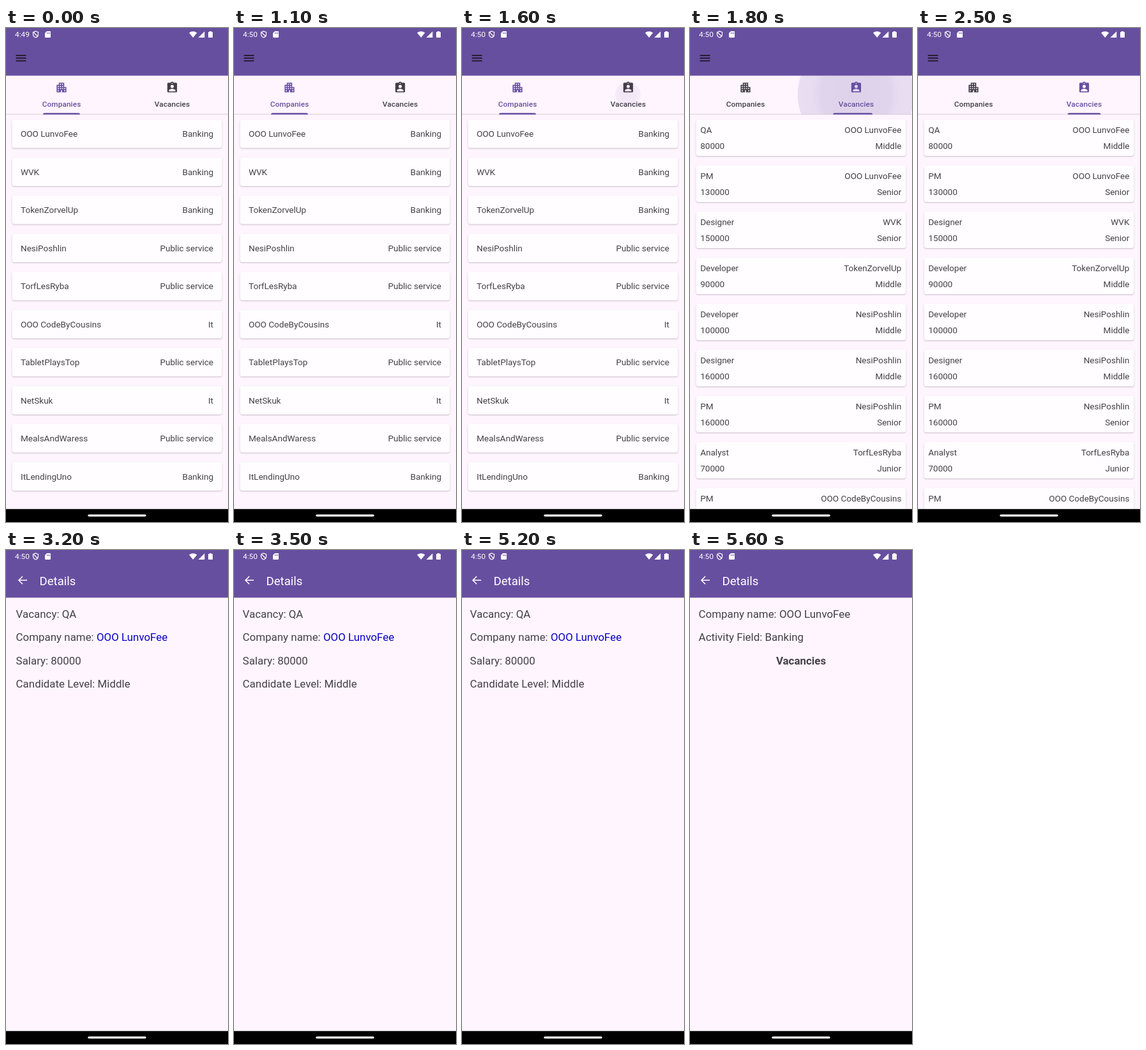
These frames come from a looping animation (348x772 px, 8 s). An HTML page with a canvas:

```html
<!DOCTYPE html>
<html lang="en">
<head>
<meta charset="utf-8">
<title>Vacancies app</title>
<style>
  html, body { margin: 0; width: 100%; height: 100%; overflow: hidden; background: #000; }
  canvas { display: block; }
</style>
</head>
<body>
<canvas id="stage" width="348" height="772"></canvas>
<script>
const ctx = document.getElementById('stage').getContext('2d');
const W = 348, LOOP = 8000;
const BAR_BOTTOM = 74.4, TABS_BOTTOM = 135.3, NAV_TOP = 751.7;
const PURPLE = '#674fa0', SURFACE = '#fef5fe', INK = '#444048', LINK = '#0a02c4';
const TIMES = { clock: 1000, press: 1570, tab: 1611, vacancy: 2970, company: 5170 };

const PAY = 'OOO LunvoFee', TRIO = 'WVK', TOKEN = 'TokenZorvelUp', DUTY = 'NesiPoshlin',
      PEAT = 'TorfLesRyba', CODE = 'OOO CodeByCousins';
const companies = [
  [PAY, 'Banking'], [TRIO, 'Banking'], [TOKEN, 'Banking'], [DUTY, 'Public service'],
  [PEAT, 'Public service'], [CODE, 'It'], ['TabletPlaysTop', 'Public service'],
  ['NetSkuk', 'It'], ['MealsAndWaress', 'Public service'], ['ItLendingUno', 'Banking']
];
const vacancies = [
  ['QA', PAY, 80000, 'Middle'], ['PM', PAY, 130000, 'Senior'],
  ['Designer', TRIO, 150000, 'Senior'], ['Developer', TOKEN, 90000, 'Middle'],
  ['Developer', DUTY, 100000, 'Middle'], ['Designer', DUTY, 160000, 'Middle'],
  ['PM', DUTY, 160000, 'Senior'], ['Analyst', PEAT, 70000, 'Junior'],
  ['PM', CODE, 120000, 'Middle']
];

const clamp = x => Math.min(1, Math.max(0, x));
const lerp = (a, b, k) => a + (b - a) * k;

// Height of a cubic Bezier curve at a given x, found by bisection.
function curveAt(x, xs, ys) {
  const at = ([a, b, c, d], s) =>
    a * (1 - s) ** 3 + 3 * b * s * (1 - s) ** 2 + 3 * c * s * s * (1 - s) + d * s ** 3;
  let lo = 0, hi = 1;
  for (let i = 0; i < 24; i++) {
    const mid = (lo + hi) / 2;
    if (at(xs, mid) < x) lo = mid; else hi = mid;
  }
  return at(ys, lo);
}
const standardEase = x => curveAt(x, [0, 0.4, 0.2, 1], [0, 0, 1, 1]);
const windowEase = x => x < 1 / 6
  ? curveAt(x, [0, 0.05, 0.1333, 1 / 6], [0, 0, 0.06, 0.4])
  : curveAt(x, [1 / 6, 0.2083, 0.25, 1], [0.4, 0.82, 1, 1]);

function rect(x, y, w, h, color, radius = 0) {
  ctx.fillStyle = color;
  ctx.beginPath();
  ctx.roundRect(x, y, w, h, radius);
  ctx.fill();
}

function text(str, x, y, size, { color = INK, align = 'left', weight = 400, spacing = 0 } = {}) {
  ctx.font = `${weight} ${size}px Roboto, sans-serif`;
  ctx.letterSpacing = spacing + 'px';
  ctx.textAlign = align;
  ctx.fillStyle = color;
  ctx.fillText(str, x, y);
  return ctx.measureText(str).width;
}

function stroke(d, color, width) {
  ctx.strokeStyle = color;
  ctx.lineWidth = width;
  ctx.stroke(new Path2D(d));
}

function fill(d, color) {
  ctx.fillStyle = color;
  ctx.fill(new Path2D(d), 'evenodd');
}

// Draws a 24-unit icon centred on a point.
function icon(d, x, y, color) {
  ctx.save();
  ctx.translate(x, y);
  ctx.scale(0.846, 0.846);
  ctx.translate(-12, -12);
  fill(d, color);
  ctx.restore();
}

let buildingIcon = 'M17 11V3H7v4H3v14h8v-4h2v4h8V11z';
[[5, 9, 13, 17], [9, 5, 9, 13], [13, 5, 9, 13], [17, 13, 17]].forEach(([x, ...ys]) =>
  ys.forEach(y => buildingIcon += `M${x} ${y}h2v2h-2z`));
const badgeIcon = 'M19 3h-4.18C14.4 1.84 13.3 1 12 1s-2.4.84-2.82 2H5c-1.1 0-2 .9-2 2v14c0 1.1.9 2 2 2h14' +
  'c1.1 0 2-.9 2-2V5c0-1.1-.9-2-2-2zM12 3a1 1 0 0 1 0 2a1 1 0 0 1 0-2zM12 7a3 3 0 0 1 0 6a3 3 0 0 1 0-6z' +
  'M18 19H6v-1.4c0-2 4-3.1 6-3.1s6 1.1 6 3.1z';

function card(y, height) {
  ctx.save();
  ctx.shadowColor = 'rgba(40,20,50,.25)';
  ctx.shadowBlur = 2;
  ctx.shadowOffsetY = 0.9;
  rect(9.45, y, 329.1, height, '#fffdff', 3.4);
  ctx.restore();
}

function companyList() {
  companies.forEach(([name, field], i) => {
    const y = 143 + 59.5 * i;
    card(y, 44.5);
    text(name, 23, y + 27.3, 13.54);
    text(field, 325, y + 27.3, 13.54, { align: 'right' });
  });
}

function vacancyList() {
  vacancies.forEach(([role, company, salary, level], i) => {
    const y = 143 + 72 * i;
    card(y, 57);
    [[role, company, 21], [salary, level, 46.3]].forEach(([left, right, dy]) => {
      text(left, 16.2, y + dy, 13.54);
      text(right, 331.4, y + dy, 13.54, { align: 'right' });
    });
  });
}

function ripple(t) {
  const age = t - TIMES.press;
  if (age <= 0 || t >= 2300) return;
  const radius = 103 * (1 - (1 - clamp(age / 450)) ** 3);
  const strength = clamp(age / 75) * clamp((2300 - t) / 400);
  const shade = ctx.createRadialGradient(260, 104, 0, 260, 104, radius);
  [[0, 0.21], [0.6, 0.2], [0.75, 0.15], [1, 0.14]].forEach(([stop, alpha]) =>
    shade.addColorStop(stop, `rgba(103,80,164,${alpha * strength})`));
  ctx.save();
  ctx.beginPath();
  ctx.rect(0, BAR_BOTTOM, W, TABS_BOTTOM - BAR_BOTTOM);
  ctx.clip();
  ctx.fillStyle = shade;
  ctx.beginPath();
  ctx.arc(260, 104, radius, 0, 7);
  ctx.fill();
  ctx.restore();
}

function tabs(t) {
  ripple(t);
  rect(-40, TABS_BOTTOM - 0.85, W + 80, 0.85, '#c9c4cd');
  const onVacancies = t >= TIMES.tab;
  [[87, 'Companies', buildingIcon, !onVacancies], [260.5, 'Vacancies', badgeIcon, onVacancies]]
    .forEach(([x, label, shape, active]) => {
      const color = active ? PURPLE : '#433e49';
      icon(shape, x, 93, color);
      text(label, x, 122.8, 11.84, { color, align: 'center', weight: 500, spacing: 0.085 });
    });
  // The leading edge runs ahead of the trailing edge.
  const angle = standardEase(clamp((t - TIMES.tab) / 250)) * Math.PI / 2;
  const left = lerp(58, 234.5, 1 - Math.cos(angle));
  const right = lerp(116, 286.5, Math.sin(angle));
  rect(left, TABS_BOTTOM - 2.55, right - left, 2.55, PURPLE, [2.5, 2.5, 0, 0]);
}

function base() {
  rect(-40, 0, W + 80, NAV_TOP + 1, SURFACE);
  rect(-40, 0, W + 80, BAR_BOTTOM, PURPLE);
}

function home(t) {
  base();
  stroke('M15.5 42.9h16M15.5 47.1h16M15.5 51.3h16', '#1d1824', 1.7);
  const slide = 1 - (1 - clamp((t - TIMES.tab) / 180)) ** 2;
  [[companyList, -slide], [vacancyList, 1 - slide]].forEach(([list, page]) => {
    if (Math.abs(page) >= 1) return;
    ctx.save();
    ctx.translate(Math.round(page * W), 0);
    list();
    ctx.restore();
  });
  tabs(t);
}

function details(lines) {
  base();
  stroke('M31 47.2H18.5M24 41.2l-6 6l6 6', '#fff', 1.6);
  text('Details', 50.5, 54.6, 18.6, { color: '#fff' });
  lines.forEach((line, i) => text(line, 13.6, 106 + 36.3 * i, 16.92));
}

function vacancyDetails() {
  const label = 'Company name: ';
  details(['Vacancy: QA', label, 'Salary: 80000', 'Candidate Level: Middle']);
  text(PAY, 13.6 + ctx.measureText(label).width, 142.3, 16.92, { color: LINK });
}

function companyDetails() {
  details(['Company name: ' + PAY, 'Activity Field: Banking']);
  text('Vacancies', 174, 178.6, 16.92, { align: 'center', weight: 700 });
}

function shifted(screen, dx, alpha, t) {
  ctx.save();
  ctx.globalAlpha = alpha;
  ctx.translate(Math.round(dx), 0);
  screen(t);
  ctx.restore();
}

// The old screen drifts left while the new one fades in from the right.
function openScreen(from, to, age, t) {
  const p = windowEase(clamp(age / 450));
  const alpha = clamp((age - 50) / 83);
  if (alpha < 1) shifted(from, -35 * p, 1, t);
  if (alpha > 0) shifted(to, 35 * (1 - p), alpha, t);
}

function systemBars(t) {
  text(t < TIMES.clock ? '4:49' : '4:50', 14, 14.2, 11.84, { color: '#fff' });
  stroke('M46.5 5l4 1.6v3.2c0 2.5-1.6 4.3-4 5.2c-2.4-.9-4-2.7-4-5.2V6.6zM43 6.5l7 7', '#fff', 1.2);
  fill('M64 5h5q1 0 1 1v8q0 1-1 1h-7q-1 0-1-1V8zM64 7v2h1V7zM66 7v2h1V7zM68 7v2h1V7z', '#fff');
  fill('M287 7.6Q293.2 2.8 299.4 7.6L293.2 15z', '#fff');
  fill('M301.5 15h9.8V5.2z', '#fff');
  fill('M319 5h3v1h1.2q.8 0 .8.8v7.4q0 .8-.8.8h-5.4q-.8 0-.8-.8V6.8q0-.8.8-.8H319z', '#fff');
  rect(0, NAV_TOP, W, 21, '#000');
  rect(128.3, 760.2, 91.4, 3.3, '#fff', 1.65);
}

function draw(t) {
  ctx.clearRect(0, 0, W, 772);
  if (t < TIMES.vacancy) home(t);
  else if (t < TIMES.company) openScreen(home, vacancyDetails, t - TIMES.vacancy, t);
  else openScreen(vacancyDetails, companyDetails, t - TIMES.company, t);
  systemBars(t);
}

const start = performance.now();
function tick() {
  draw((performance.now() - start) % LOOP);
  requestAnimationFrame(tick);
}
tick();
</script>
</body>
</html>
```
